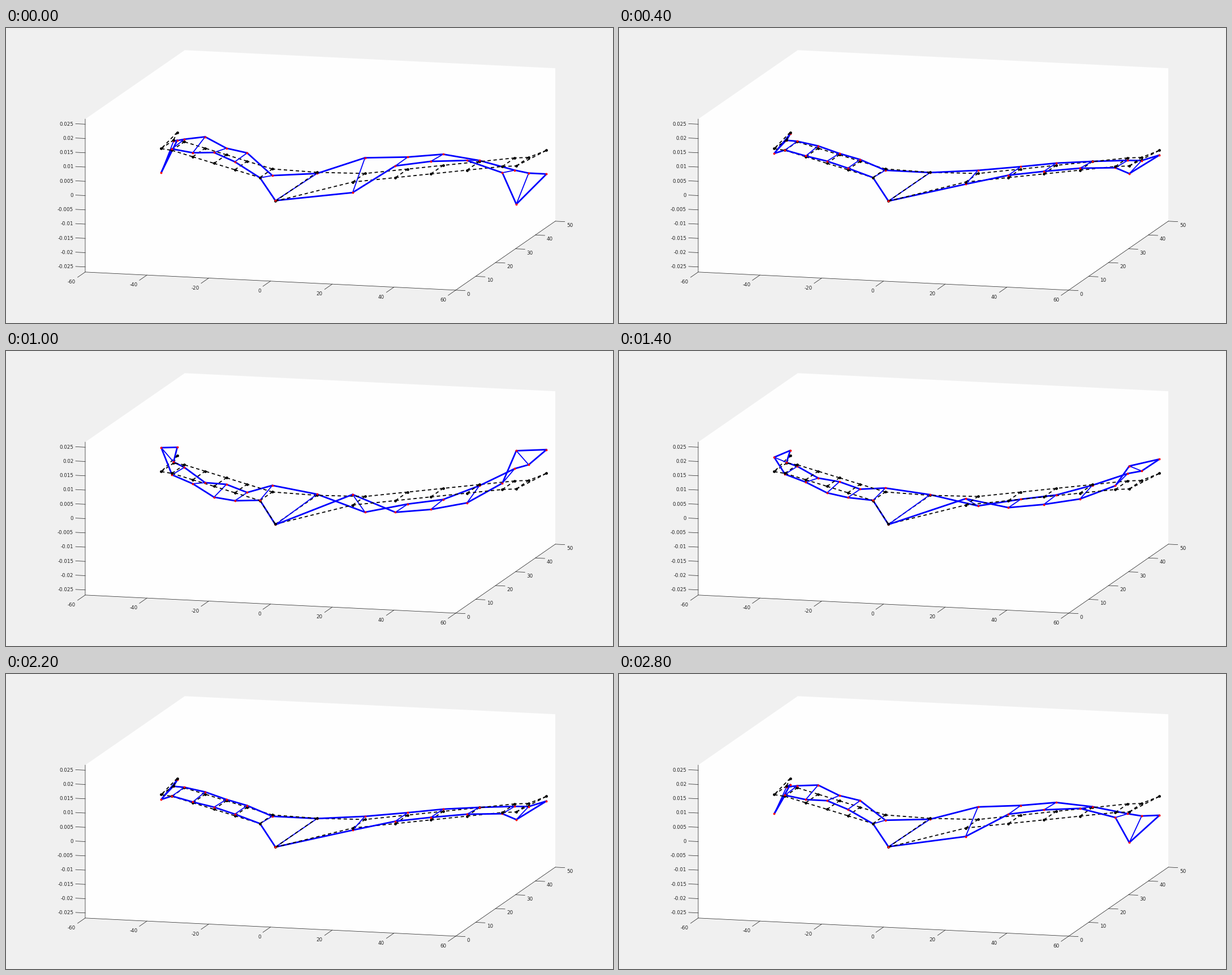
These frames come from a looping animation (1073x522 px, 3000 ms). A matplotlib script:

```python
import numpy as np
import matplotlib.pyplot as plt
from matplotlib.animation import FuncAnimation

W, H, DPI = 1073, 522, 64
PX = 72 / DPI  # points per pixel
STEPS, STEP_MS = 15, 200
INK, BLUE, RED = "#262626", "#0000ff", "#ff0000"
Z_MAX = 0.0268

fig = plt.figure(figsize=(W / DPI, H / DPI), dpi=DPI, facecolor="#f0f0f0")
ax = fig.add_axes([0, 0, 1, 1])
ax.set_xlim(0, W)
ax.set_ylim(H, 0)
ax.axis("off")


def project(x, y, z):
    """Orthographic view of the data box in screen pixels."""
    u, v = (x + 60) / 120, y / 50
    return 140 + 655 * u + 176 * v, 296.5 + 32 * u - 122 * v - 5050 * z


def line(xs, ys, color, width, z, **style):
    return ax.plot(xs, ys, color=color, lw=width * PX, zorder=z, **style)[0]


def dot(x, y, color, size, z):
    return ax.plot([x], [y], "o", color=color, ms=size * PX, mew=0, zorder=z)[0]


def path(*points):
    return zip(*(project(*p) for p in points))


def tick(start, end, offset, value, align):
    line(*path(start, end), INK, 0.75, 1)
    x, y = project(*start)
    ax.text(x + offset[0], y + offset[1] + 3.2, f"{value:g}", ha=align,
            va="baseline", color=INK, family="DejaVu Sans", size=8.8 * PX)


def draw_box():
    lo, hi = -Z_MAX, Z_MAX
    ax.fill(*path((-60, 0, hi), (-60, 50, hi), (60, 50, hi),
                  (60, 50, lo), (60, 0, lo), (-60, 0, lo)),
            color="#fefefe", lw=0, zorder=0)
    line(*path((-60, 0, hi), (-60, 0, lo), (60, 0, lo), (60, 50, lo)),
         INK, 0.75, 1)
    for k in range(-5, 6):
        z = k / 200
        tick((-60, 0, z), (-63.1, 0, z), (-20.7, -0.9), z, "right")
    for x in range(-60, 61, 20):
        tick((x, 0, lo), (x, -3.8, lo), (-16.7, 17), x, "right")
    for y in range(0, 51, 10):
        tick((60, y, lo), (63.05, y, lo), (19.8, 6.7), y, "left")


# Planform: swept wing, mirrored about x = 0, with constant chord outboard
half = np.array([15, 26, 35.1, 44.4, 53.5, 57.5])
span = np.concatenate([-half[::-1], [0], half])
front = np.interp(abs(span), [0, 15, 53.5, 57.5], [2.5, 18, 33.5, 34.3])
chord = np.where(span == 0, 20.9, 6.2)

# Mode shape at each station, left to right, in thousandths of z
bend_front = [-8.4, 0.5, 1.4, 3.8, 2.8, -0.1, 0.2,
              -3.7, 4.1, 4.4, 3.4, -2.2, -13.4]
bend_back = [-0.4, 0.9, 4, 2.3, 2.9, -2.3, -0.4,
             5.5, 4.2, 3.9, 0.4, -4.3, -5.5]
bend_tips = [-2.8, -8.3]


def around(left, fore, right, aft):
    """Order values along the outline: left tip, front, right tip, back."""
    return np.concatenate([[left], fore, [right], aft[::-1]])


px = around(-59.8, span, 59.8, span)
py = around(45.9, front, 45.9, front + chord)
mode = around(bend_tips[0], bend_front, bend_tips[1], bend_back) / 1000
sx, rest = project(px, py, 0)

n = len(px)
outline = [(i, (i + 1) % n) for i in range(n)]
ribs = [(i, n - i) for i in range(1, len(span) + 1)]
edges = outline + ribs

draw_box()
for a, b in edges:
    line(sx[[a, b]], rest[[a, b]], "black", 1.8, 3,
         linestyle=(0, (3.3, 2.6)), dash_capstyle="butt")
for x, y in zip(sx, rest):
    dot(x, y, "black", 4.8, 6)

bars = [line(sx[[a, b]], rest[[a, b]], BLUE, 2.8 if k < n else 1.8, 2,
             solid_capstyle="round") for k, (a, b) in enumerate(edges)]
nodes = [dot(x, y, RED, 3.8, 5) for x, y in zip(sx, rest)]


def amplitude(step):
    """Fast sweep from +1 to -1, then a return at half the speed."""
    return 1 - 0.4 * step if step <= 5 else -1 + 0.2 * (step - 5)


def update(step):
    z = amplitude(step) * mode
    ys = project(px, py, z)[1]
    # Raised parts lie in front of the rest shape, lowered ones behind it
    for bar, (a, b) in zip(bars, edges):
        bar.set_ydata(ys[[a, b]])
        bar.set_zorder(4 if z[a] + z[b] > 0 else 2)
    for node, y, lift in zip(nodes, ys, z):
        node.set_ydata([y])
        node.set_zorder(7 if lift > 0 else 5)
    return bars + nodes


anim = FuncAnimation(fig, update, frames=STEPS, interval=STEP_MS,
                     init_func=lambda: update(0), repeat=True,
                     repeat_delay=0, blit=False)
plt.show()
```
